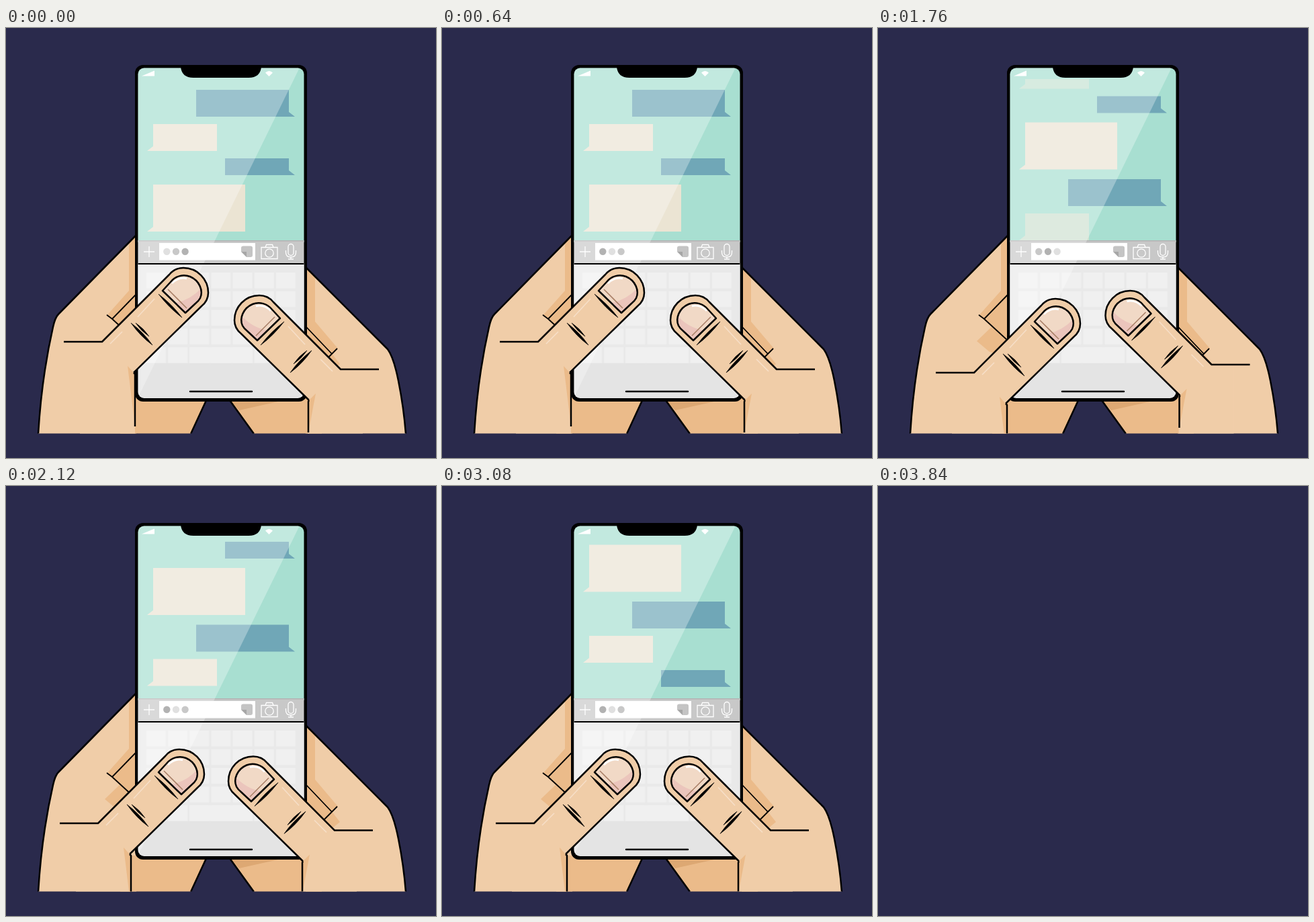
These frames come from a looping animation (640 by 640 pixels, 3880 ms). An HTML page without scripts:

```html
<!DOCTYPE html>
<html lang="en">
<head>
<meta charset="utf-8">
<title>Texting hands</title>
<style>
html, body { margin: 0; width: 100%; height: 100%; overflow: hidden; background: #2a2a4c; }
svg { display: block; width: 100vw; height: 100vh; }
.skin { fill: #f0cda8; }
.shade { fill: #ebbb8a; }
.deep { fill: #dda873; }
.line { fill: none; stroke: #000; stroke-width: 2.5; stroke-linejoin: round; }
.thin { stroke-width: 1.8; }
.glow { fill: none; stroke: #f7dfc8; stroke-width: 1.6; }
.icon { fill: none; stroke: #fff; stroke-width: 1.3; }
.sent { fill: #70a7b7; }
.got { fill: #ebe4d3; }
</style>
</head>
<body>
<svg viewBox="0 0 640 640">
<defs>
  <clipPath id="stage"><rect width="640" height="603.5"/></clipPath>
  <clipPath id="screen"><rect x="196.5" y="59.5" width="247" height="491.5" rx="9"/></clipPath>
  <clipPath id="chat"><rect x="196" y="76" width="248" height="240"/></clipPath>
  <pattern id="keys" x="209" y="364" width="32.15" height="27.8" patternUnits="userSpaceOnUse">
    <rect width="29" height="23.5" fill="#f0f0f0"/>
  </pattern>

  <path id="sentLong" class="sent" d="M283 92H421V125L430 132H283Z"/>
  <path id="gotShort" class="got" d="M219 143H314V183H210L219 176Z"/>
  <path id="sentShort" class="sent" d="M326 194H421V212L430 219H326Z"/>
  <path id="gotLong" class="got" d="M219 233H356V303H210L219 296Z"/>

  <g id="thumb">
    <path class="skin" d="M143 467 243 367Q251 357 264 357C285 357 301 374 301 394Q301 406 291 414L190 513 192 516V680H110V467Z"/>
    <path class="line" d="M86 467H143L243 367Q251 357 264 357C285 357 301 374 301 394Q301 406 291 414L190 513"/>
    <path d="M233 391 245 378C252 369 264 366 274 370C288 376 294 391 289 402Q287 406 282 410L267 424Z" fill="#f1d9c6"/>
    <path d="M290 388Q293 397 288 404L267 424 252 409Q274 405 290 388Z" fill="#ebc5bc"/>
    <path d="M247 380Q257 370 269 373" fill="none" stroke="#fff" stroke-width="2.5"/>
    <path d="M241 389 269 417" fill="none" stroke="#a98068" stroke-width="1.6"/>
    <path class="line" d="M233 391 245 378C252 369 264 366 274 370C288 376 294 391 289 402Q287 406 282 410L267 424Z"/>
    <path d="M227 396Q247 411 262 431Q243 417 227 396ZM186 439Q205 453 218 472Q200 459 186 439ZM193 439Q205 447 213 459Q201 451 193 439Z" stroke="#000" stroke-width=".6"/>
    <path class="glow" d="M196 430 221 403M155 470 173 452"/>
  </g>
</defs>

<rect width="640" height="640" fill="#2a2a4c"/>

<g clip-path="url(#stage)">
  <animate attributeName="visibility" values="visible;hidden" keyTimes="0;.98969" calcMode="discrete" dur="3.88s" repeatCount="indefinite"/>

  <!-- palms -->
  <path class="skin" d="M194 308 78 426Q73 431 70 445Q53 520 48 604H194Z"/>
  <path class="shade" d="M194 308 183 319V391L150 428 158 434 169 445 147 466 166 482 194 490Z"/>
  <path class="line" d="M194 308 78 426Q73 431 70 445Q53 520 48 604"/>
  <path class="line thin" d="M194 396 158 433 150 427M158 433 194 466"/>

  <path class="skin" d="M446 356 568 478Q577 490 584 525Q592 565 595 604H446Z"/>
  <path class="shade" d="M446 356 460 370V437L494 477 486 486 497 500 480 514 446 480Z"/>
  <path class="line" d="M446 356 568 478Q577 490 584 525Q592 565 595 604"/>
  <path class="line thin" d="M446 444 485 485 493 477M485 485 472 498"/>

  <!-- fingers behind the phone -->
  <path class="shade" d="M170 550H300L275 604H170ZM330 550 369 604H470V550Z"/>
  <path class="deep" d="M333 554H414L347 569Z"/>
  <path class="line" d="M300 550 275 604M330 550 369 604"/>

  <!-- phone -->
  <rect x="192" y="55" width="256" height="501" rx="12"/>
  <g clip-path="url(#screen)">
    <rect x="196" y="59" width="248" height="260" fill="#a8dfd1"/>
    <g clip-path="url(#chat)">
      <g>
        <animateTransform attributeName="transform" type="translate" dur="3.88s" repeatCount="indefinite" calcMode="spline"
          values="0 0;0 0;0 -61.5;0 -61.5;0 -111;0 -111;0 -145.5;0 -145.5;0 -225.5;0 -225.5"
          keyTimes="0;.16495;.23711;.41237;.48454;.65979;.73196;.90722;.97938;1"
          keySplines="0 0 1 1;.42 0 .58 1;0 0 1 1;.42 0 .58 1;0 0 1 1;.42 0 .58 1;0 0 1 1;.42 0 .58 1;0 0 1 1"/>
        <use href="#sentLong"><animate attributeName="opacity" values="1;1;0;0" keyTimes="0;.16495;.23711;1" dur="3.88s" repeatCount="indefinite"/></use>
        <use href="#gotShort"><animate attributeName="opacity" values="1;1;0;0" keyTimes="0;.41237;.48454;1" dur="3.88s" repeatCount="indefinite"/></use>
        <use href="#sentShort"><animate attributeName="opacity" values="1;1;0;0" keyTimes="0;.65979;.73196;1" dur="3.88s" repeatCount="indefinite"/></use>
        <use href="#gotLong"><animate attributeName="opacity" values="1;1;0;0" keyTimes="0;.90722;.97938;1" dur="3.88s" repeatCount="indefinite"/></use>
        <g transform="translate(0 225.5)">
          <use href="#sentLong"><animate attributeName="opacity" values="0;0;1;1" keyTimes="0;.16495;.23711;1" dur="3.88s" repeatCount="indefinite"/></use>
          <use href="#gotShort"><animate attributeName="opacity" values="0;0;1;1" keyTimes="0;.41237;.48454;1" dur="3.88s" repeatCount="indefinite"/></use>
          <use href="#sentShort"><animate attributeName="opacity" values="0;0;1;1" keyTimes="0;.65979;.73196;1" dur="3.88s" repeatCount="indefinite"/></use>
          <use href="#gotLong"><animate attributeName="opacity" values="0;0;1;1" keyTimes="0;.90722;.97938;1" dur="3.88s" repeatCount="indefinite"/></use>
        </g>
      </g>
    </g>

    <!-- keyboard -->
    <rect x="196" y="350" width="248" height="202" fill="#e4e4e4"/>
    <rect x="196" y="350" width="248" height="149" fill="#e9e9e9"/>
    <rect x="209" y="364" width="222" height="134.7" fill="url(#keys)"/>
    <rect x="273.3" y="475.2" width="93.3" height="23.5" fill="#f0f0f0"/>

    <!-- input bar -->
    <rect x="196" y="316" width="248" height="35" fill="#c8c8c8"/>
    <path d="M196 316.7H444" stroke="#b3b3b3" stroke-width="1.4"/>
    <path d="M437 59 196 551V59Z" fill="#fff" opacity=".3"/>
    <rect x="228" y="320" width="143" height="25.5" fill="#fff"/>
    <circle cx="239.3" cy="332.8" r="5.2" fill="#e0e0e0">
      <animate attributeName="fill" values="#e0e0e0;#b2b2b2;#c8c8c8" calcMode="discrete" dur=".48s" begin="loop.begin" repeatCount="8"/>
    </circle>
    <circle cx="253" cy="332.8" r="5.2" fill="#c8c8c8">
      <animate attributeName="fill" values="#c8c8c8;#e0e0e0;#b2b2b2" calcMode="discrete" dur=".48s" begin="loop.begin" repeatCount="8"/>
    </circle>
    <circle cx="266.6" cy="332.8" r="5.2" fill="#b2b2b2">
      <animate attributeName="fill" values="#b2b2b2;#c8c8c8;#e0e0e0" calcMode="discrete" dur=".48s" begin="loop.begin" repeatCount="8"/>
    </circle>
    <path d="M353 324.5H364Q367 324.5 367 327.5V338Q367 341 364 341H358V333H350V327.5Q350 324.5 353 324.5Z" fill="#c4c4c4"/>
    <path d="M350 333H358V341Z" fill="#a6a6a6"/>
    <path class="icon" d="M213 325V341M205 333H221" stroke-width="2"/>
    <path class="icon" d="M380 326.5H386L387.5 322.5H396.5L398 326.5H404V343.5H380ZM386 326.5H398"/>
    <circle class="icon" cx="392" cy="335" r="6.2"/>
    <rect class="icon" x="420" y="321.5" width="8" height="17" rx="4"/>
    <path class="icon" d="M416.500 331V334Q416.500 341 424 341T431.500 334V331M424 341V344M420 344H428"/>
    <path d="M196 351H444" stroke="#000" stroke-width="2"/>
    <path d="M274 541H366" stroke="#000" stroke-width="2.5" stroke-linecap="round"/>
    <path d="M202 71.500 221 63.500V71.500ZM386 66.500Q391.500 61.500 397 66.500L391.500 72Z" fill="#fff"/>
  </g>
  <path d="M260 57Q261 74 279 74H361Q379 74 380 57Z"/>

  <!-- thumbs -->
  <g>
    <animateTransform id="loop" attributeName="transform" type="translate" values="0 0;0 0" dur="3.88s" begin="0s;loop.end"/>
    <g>
      <animateTransform attributeName="transform" type="translate" dur=".96s" begin="loop.begin" repeatCount="4" calcMode="spline"
        values="0 0;-6 35;1.5 33;3 25;0 0;0 46;0 0"
        keyTimes="0;.20833;.29167;.58333;.66667;.83333;1"
        keySplines=".4 0 .6 1;.4 0 .6 1;.4 0 .6 1;.4 0 .6 1;.4 0 .6 1;.4 0 .6 1"/>
      <use href="#thumb"/>
      <path class="shade" d="M181 503 190 513 192 516V593Z"/>
      <path class="line" d="M190 513 192 515V593"/>
    </g>
    <g>
      <animateTransform attributeName="transform" type="translate" dur=".96s" begin="loop.begin" repeatCount="4" calcMode="spline"
        values="0 0;-9 4.5;0 -10;6 -11.5;0 0;-1.5 -7;0 0"
        keyTimes="0;.20833;.29167;.58333;.66667;.83333;1"
        keySplines=".4 0 .6 1;.4 0 .6 1;.4 0 .6 1;.4 0 .6 1;.4 0 .6 1;.4 0 .6 1"/>
      <use href="#thumb" transform="translate(641 41) scale(-1 1)"/>
      <path class="shade" d="M461 544 450 555V602Z"/>
      <path class="line" d="M451 554 450 556V602"/>
    </g>
  </g>
</g>
</svg>
</body>
</html>
```
